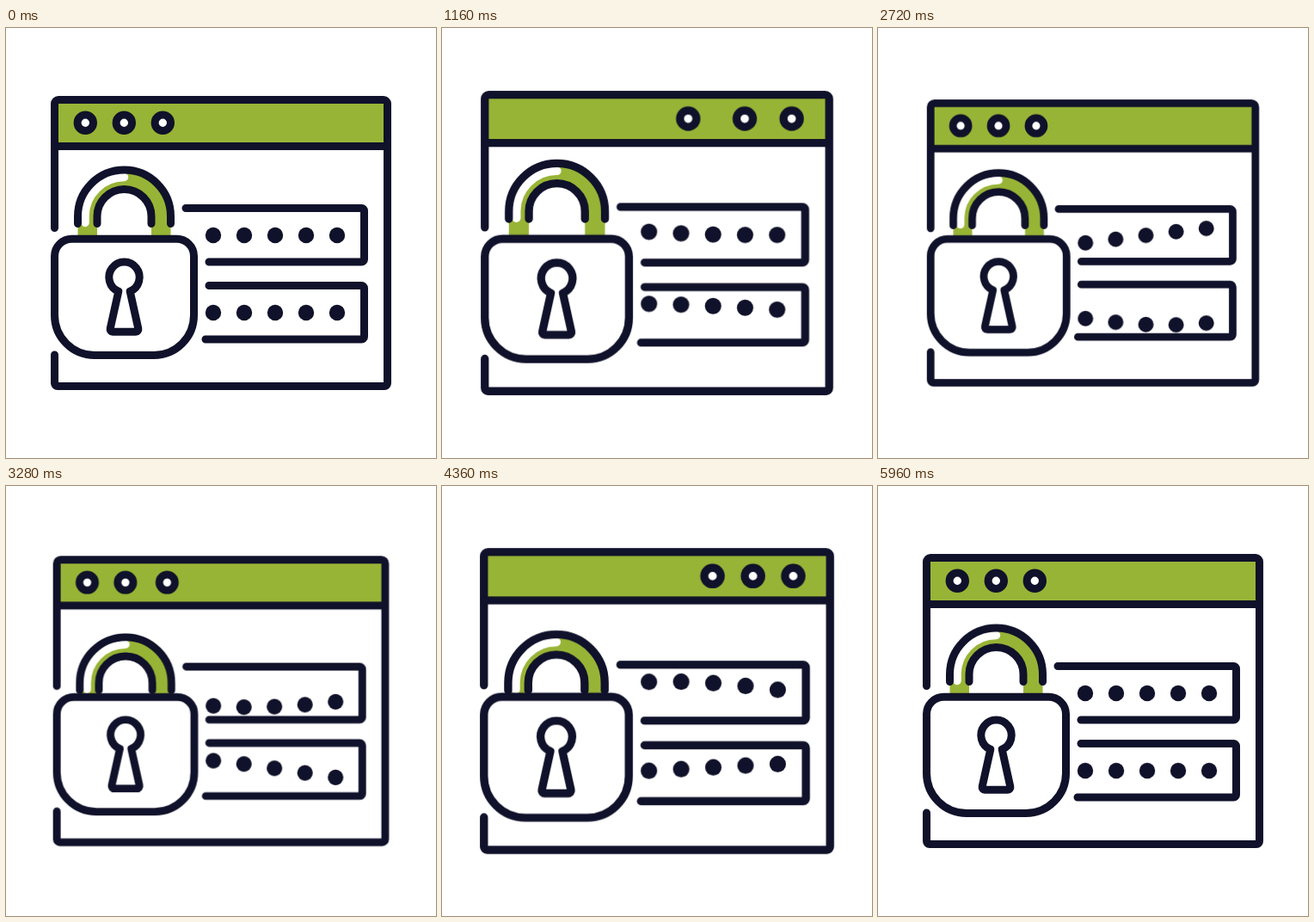
Recreate the animation shown at these times as an HTML page without scripts. Size 500 by 500 pixels, loop 6000 ms.

```html
<!DOCTYPE html>
<html lang="en">
<head>
<meta charset="utf-8">
<title>Secure login</title>
<style>
  html, body { margin: 0; width: 100%; height: 100%; overflow: hidden; background: #fff; }
  svg { display: block; width: 100%; height: 100%; }

  :root { --ink: #10112a; --green: #98b436; --ease: cubic-bezier(.33, 0, .67, 1); }

  .line { fill: none; stroke: var(--ink); stroke-width: 9; stroke-linecap: round; stroke-linejoin: round; }
  .solid { fill: #fff; }
  .green { fill: var(--green); }
  .shine { fill: none; stroke: #fff; stroke-width: 9.5; stroke-linecap: round; }
  .dots { fill: var(--ink); }

  .scene, .shackle, .lights circle, .dots circle {
    animation: 6s var(--ease) infinite;
  }

  .scene { transform-origin: 250px 250px; animation-name: pulse; }
  @keyframes pulse {
    0%, 100% { transform: scale(1); }
    25% { transform: scale(1.04); }
    47.5% { transform: scale(.974); }
    73.33% { transform: scale(1.04); }
  }

  .shackle { animation-name: latch; }
  @keyframes latch {
    0%, 100% { transform: translateY(0); }
    25%, 33.33% { transform: translateY(-5.2px); }
    62.5% { transform: translateY(13px); }
  }

  /* window buttons: the right one leaves first, the left one returns first */
  .lights circle { animation-duration: 3s; }
  .lights :nth-child(1) { animation-name: slide-a; }
  .lights :nth-child(2) { animation-name: slide-b; }
  .lights :nth-child(3) { animation-name: slide-c; }
  @keyframes slide-a {
    0%, 12.67%, 83.33%, 100% { transform: translateX(0); }
    46%, 50% { transform: translateX(220px); }
  }
  @keyframes slide-b {
    0%, 9.33%, 84%, 100% { transform: translateX(0); }
    42.67%, 50.67% { transform: translateX(220px); }
  }
  @keyframes slide-c {
    0%, 6.67%, 88%, 100% { transform: translateX(0); }
    40%, 52% { transform: translateX(220px); }
  }

  /* password dots: a wave travelling to the right */
  .dots circle { animation-delay: calc(var(--i) * var(--step)); }
  .dots :nth-child(1) { --i: 0; }
  .dots :nth-child(2) { --i: 1; }
  .dots :nth-child(3) { --i: 2; }
  .dots :nth-child(4) { --i: 3; }
  .dots :nth-child(5) { --i: 4; }
  .upper { --step: 131ms; }
  .lower { --step: 140ms; }
  .upper circle { animation-name: wave-upper; }
  .lower circle { animation-name: wave-lower; }
  @keyframes wave-upper {
    0%, 12.83%, 91.05%, 100% { transform: translateY(0); }
    31.67%, 71% { transform: translateY(-12.7px); }
    52.07% { transform: translateY(16.2px); }
  }
  @keyframes wave-lower {
    0%, 79.67%, 100% { transform: translateY(0); }
    20.67%, 57.67% { transform: translateY(-12.7px); }
    39.17% { transform: translateY(16.7px); }
  }
</style>
</head>
<body>
<svg viewBox="0 0 500 500">
  <g class="scene">
    <!-- window -->
    <rect class="green" x="57" y="84" width="386" height="53" rx="4"/>
    <path class="line" d="M56.5 232.5V88a4.5 4.5 0 0 1 4.5-4.5H439a4.5 4.5 0 0 1 4.5 4.5V413a3.5 3.5 0 0 1-3.5 3.5H60a3.5 3.5 0 0 1-3.5-3.5V380"/>
    <path class="line" d="M58 137.5H442"/>
    <g class="lights line">
      <circle class="solid" cx="92.3" cy="110.3" r="9.2"/>
      <circle class="solid" cx="137.3" cy="110.3" r="9.2"/>
      <circle class="solid" cx="182.3" cy="110.3" r="9.2"/>
    </g>

    <!-- fields -->
    <path class="line" d="M209 209.5H413.500a3 3 0 0 1 3 3V269a3 3 0 0 1-3 3H236"/>
    <path class="line" d="M236 299.500H413.500a3 3 0 0 1 3 3V359a3 3 0 0 1-3 3H232"/>
    <g class="dots upper">
      <circle cx="241" cy="241" r="9.2"/>
      <circle cx="277" cy="241" r="9.2"/>
      <circle cx="313" cy="241" r="9.2"/>
      <circle cx="349" cy="241" r="9.2"/>
      <circle cx="385" cy="241" r="9.2"/>
    </g>
    <g class="dots lower">
      <circle cx="241" cy="331" r="9.2"/>
      <circle cx="277" cy="331" r="9.2"/>
      <circle cx="313" cy="331" r="9.2"/>
      <circle cx="349" cy="331" r="9.2"/>
      <circle cx="385" cy="331" r="9.2"/>
    </g>

    <!-- padlock -->
    <g class="shackle">
      <path class="green" d="M83.500 256V219a54 54 0 0 1 108 0V256H169V219a31.500 31.500 0 0 0-63 0V256Z"/>
      <path class="shine" d="M92 226.500V219a45.500 45.500 0 0 1 45.500-45.500"/>
      <path class="line" d="M83.500 227.500V219a54 54 0 0 1 108 0V227.500"/>
      <path class="line" d="M106 227.500V219a31.500 31.500 0 0 1 63 0V227.500"/>
    </g>
    <path class="line" style="fill:#fff" d="M76.500 245.300H198.500a20 20 0 0 1 20 20V334a46.500 46.500 0 0 1-46.500 46.500H103a46.500 46.500 0 0 1-46.500-46.500V265.300a20 20 0 0 1 20-20Z"/>
    <path class="line" d="M130.800 306.200A17.700 17.700 0 1 1 144.200 306.200L153.800 349.500a3 3 0 0 1-3 3.700H124.200a3 3 0 0 1-3-3.700Z"/>
  </g>
  <style>.lights .solid { fill: #fff; }</style>
</svg>
</body>
</html>
```
